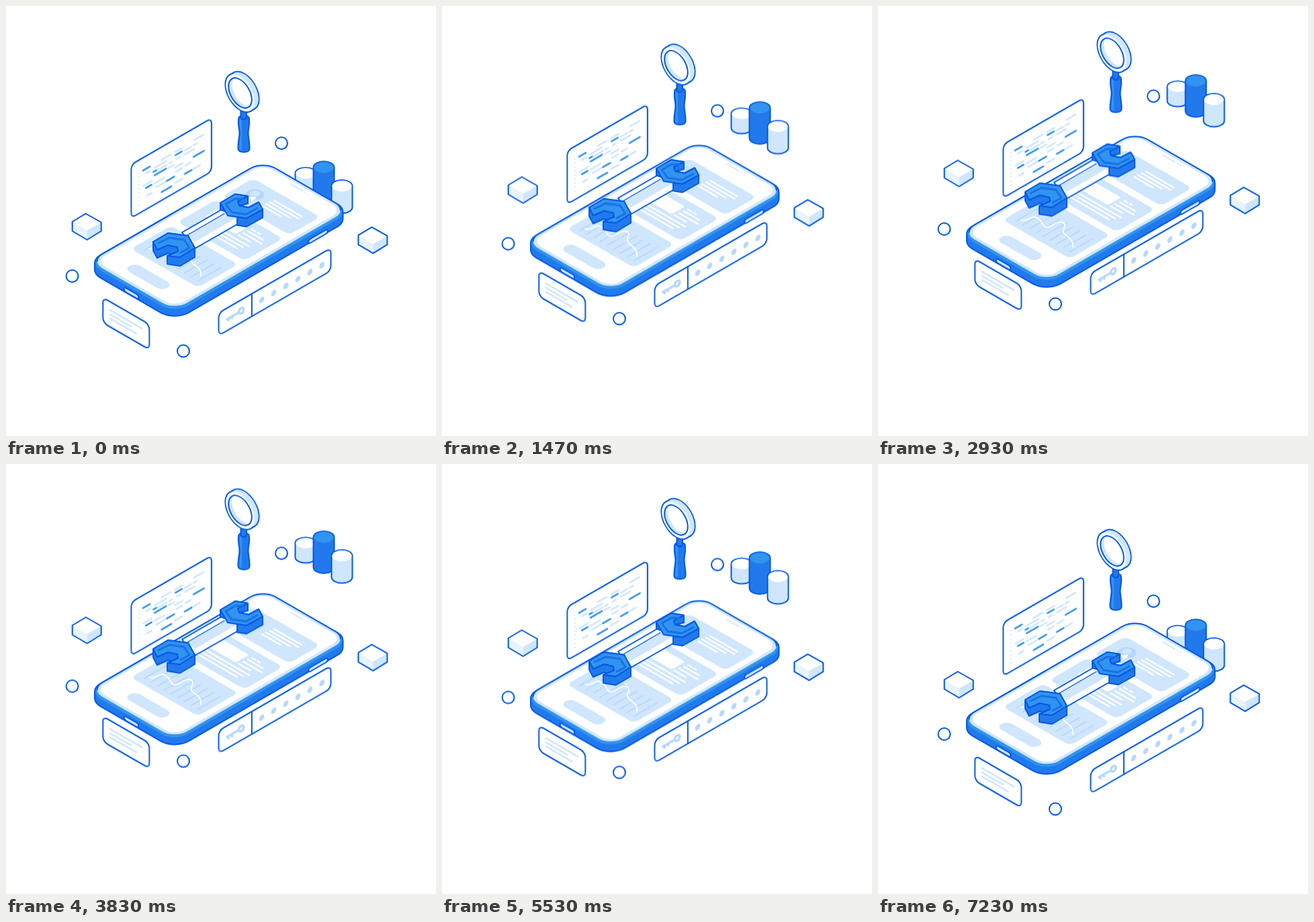
An HTML page without scripts for the animation above (7.93 s loop, 640x640 px).

```html
<!DOCTYPE html>
<html lang="en">
<head>
<meta charset="utf-8">
<title>Isometric phone repair</title>
<style>
  html, body { margin: 0; height: 100%; overflow: hidden; background: #fff; }
  svg { display: block; width: 100vw; height: 100vh; }
  svg * { vector-effect: non-scaling-stroke; }

  .float { animation: float 7930ms infinite; }
  @keyframes float {
    0% { transform: translateY(0); animation-timing-function: cubic-bezier(.325, 0, .19, 1); }
    45.586% { transform: translateY(var(--rise)); animation-timing-function: cubic-bezier(.81, 0, .675, 1); }
    91.173%, 100% { transform: translateY(0); }
  }

  .line { stroke: #0058e6; stroke-width: 2; stroke-linejoin: round; stroke-linecap: round; }
  .none { fill: none; }
  .white { fill: #fff; }
  .faint { fill: #e8f3fe; }
  .pale { fill: #cfe6fd; }
  .soft { fill: #b7d8fb; }
  .bright { fill: #3094f0; }
  .deep { fill: #2279eb; }
  .text { fill: none; stroke: #cfe6fd; stroke-width: 2.5; stroke-linecap: round; }
  .text.hot { stroke: #3094f0; }
  .text.clear { stroke: #fff; }
  .groove { fill: none; stroke: #1b6fe6; stroke-width: 2.8; stroke-linejoin: round; stroke-linecap: round; }
</style>
</head>
<body>
<svg viewBox="0 0 640 640" xmlns="http://www.w3.org/2000/svg">
  <defs>
    <clipPath id="lens"><circle r="20"/></clipPath>
    <clipPath id="disc"><circle r="9"/></clipPath>
    <g id="ball">
      <circle r="9" fill="#dcecfd"/>
      <circle cx="-2" cy="-2" r="8.6" class="white" clip-path="url(#disc)"/>
      <circle r="9" class="line none"/>
    </g>
    <g id="cube">
      <path class="white" d="M-2-24L21-11L0 1L-22-12Z"/>
      <path class="faint" d="M-22-12L0 1V15L-22 2Z"/>
      <path class="pale" d="M21-11L0 1V15L21 2Z"/>
      <path class="line none" d="M-2-24L21-11V2L0 15L-22 2V-12Z"/>
    </g>
  </defs>

  <!-- cylinders -->
  <g class="float" style="--rise:-131.5px">
    <path class="line pale" d="M430.5 249V270A15.5 8.5 0 0 0 461.5 270V249A15.5 8.5 0 0 0 430.5 249Z"/>
    <ellipse class="white" cx="446" cy="249" rx="14.5" ry="7.7"/>
    <path class="line deep" d="M457.5 240.2V285A15.5 9 0 0 0 488.5 285V240.2A15.5 9 0 0 0 457.5 240.2Z"/>
    <ellipse class="bright" cx="473" cy="240.2" rx="14.5" ry="8.2"/>
    <path class="line pale" d="M484.5 268V299.5A15.5 9 0 0 0 515.5 299.5V268A15.5 9 0 0 0 484.5 268Z"/>
    <ellipse class="white" cx="500" cy="268" rx="14.5" ry="8.2"/>
  </g>

  <!-- code panel -->
  <g class="float" style="--rise:-30.5px">
    <g transform="matrix(.866 -.5 0 1 186.4 236)">
      <rect class="line white" width="138" height="79.4" rx="7"/>
      <path class="text" stroke-dasharray="1.5 4.5" style="stroke-linecap:butt" d="M13 18V68"/>
      <path class="text" d="M52 19h16M75 19h13M108 17.5h16
        M25 26h8M40 25h20M92 25h11M107 25h6
        M46 31h15M65 31h5M78 31h6M92 31h16
        M21 42h14M64 37h10M75 42h13
        M40 48h17M77 49h10M93 48h10
        M43 55h15M27 60h8M107 60h11M75 65h13"/>
      <path class="text hot" d="M20 19h12M76 24h11M38 30h5M40 36h20M107 42h18M25 47.5h10M61 55h13M92 60h12M52 67h17"/>
    </g>
  </g>

  <!-- phone -->
  <g class="float" style="--rise:-44px">
    <path class="line deep" d="M132 382.6A29.4 17 0 0 1 140.6 370.6L361.7 243A29.4 17 0 0 1 403.3 243L492.9 294.7A29.4 17 0 0 1 501.5 306.7V316.7A29.4 17 0 0 1 492.9 328.7L271.8 456.4A29.4 17 0 0 1 230.2 456.4L140.6 404.6A29.4 17 0 0 1 132 392.6Z"/>
    <g transform="matrix(.866 .5 -.866 .5 382.5 228)">
      <rect class="bright" x="4" y="4" width="149.5" height="301.3" rx="23"/>
      <rect class="pale" x="3" y="3" width="145.5" height="297.3" rx="21"/>
      <rect class="white" x="7.5" y="7.5" width="136.5" height="288.3" rx="17"/>
      <path class="line none" d="M9.2 294.2A21 21 0 0 1 3 279.3V24A21 21 0 0 1 24 3H127.5A21 21 0 0 1 142.3 9.2"/>
      <path class="text" style="stroke-width:2" d="M61 13h20M86 13h.1M91 13h.1"/>

      <g class="pale">
        <rect x="20" y="37" width="115" height="53" rx="8"/>
        <rect x="20" y="101" width="115" height="66" rx="8"/>
        <rect x="20" y="178" width="115" height="69" rx="8"/>
        <rect x="44" y="264.5" width="65" height="18" rx="9"/>
      </g>

      <circle class="soft" cx="46" cy="60" r="11.5"/>
      <circle class="pale" cx="44" cy="58" r="6"/>
      <path class="white" d="M50 62a8 8 0 0 1 2 10l-8-4z"/>
      <path class="text clear" d="M71 52H118M70 58H119M69 64H110M69 70H101"/>

      <rect class="white" x="36" y="112" width="52" height="23" rx="3"/>
      <path class="text clear" d="M95 114h6M105 114h4M94 120H120M93 127H125M92 134H112M38 142H118M38 148.5H114M38 155H110"/>

      <path class="none" stroke="#b7d8fb" stroke-width="1.5" d="M33 197V238M44.5 197V238M56 197V238M67.5 197V238M79 197V238M90.5 197V238M102 197V238M113.5 197V238M125 197V238"/>
    </g>
    <path class="text clear" style="stroke-width:1.8" d="M213 361C222 366 228 352 238 359C248 366 244 376 257 371C270 362 281 362 277 374C270 386 292 384 290 402"/>
    <rect class="line pale" x="-16.5" y="-3" width="33" height="6" rx="3" transform="matrix(.866 -.5 0 1 464.5 343)"/>
    <rect class="line pale" x="-12.5" y="-3" width="25" height="6" rx="3" transform="matrix(.866 .5 0 1 186.5 427.5)"/>
  </g>

  <!-- wrench: the shaft joins the front side of the far head -->
  <g class="float" style="--rise:-76px">
    <path class="line deep" d="M319 293L341 280L360 283V294L348 297L361 300L376 292L382 303V315L358 328.5L330 324L319 306Z"/>
    <path class="line white" d="M262 337L320 303.5L344 312V325L281 361Z"/>
    <path class="pale" d="M270 341L325 309L343 315L281 351Z"/>
    <path class="line none" style="stroke-width:1.4" d="M270 341L325 309"/>
    <path class="line bright" d="M319 293L341 280L360 283L345 291L347 297L361 300L376 292L382 303L358 316L330 312Z"/>
    <path class="groove" d="M352 287L341 287L327 295L336 307L357 310L374 301"/>

    <path class="line deep" d="M219 351L241 338L271 342L281 360V374L259 387L240 384V372L246 369.5L241 368L225 375L219 364Z"/>
    <path class="line bright" d="M219 351L241 338L271 342L281 360L259 374L240 372L256 365L255 359L241 356L225 363Z"/>
    <path class="groove" d="M227 353L243 345L265 348L273 360L260 367"/>
  </g>

  <!-- magnifier -->
  <g class="float" style="--rise:-60.5px">
    <path class="line deep" d="M346 168Q346 163 354 163T362 168C363 178 360.5 182 360.5 189S363 203 362.5 213Q362 217.5 354 217.5T345.5 213C345 203 347.5 196 347.5 189S345 178 346 168Z"/>
    <path class="bright" d="M347.5 168C347 178 349 182 349 189S347 203 347 213L351 215.5V166Z"/>
    <path class="line deep" d="M349.5 154V167Q354 171 358 167V154Z"/>
    <g transform="matrix(.866 .5 0 1 354.5 126)"><circle class="line pale" r="25.5"/></g>
    <g transform="matrix(.866 .5 0 1 348.5 129.5)"><circle class="line pale" r="25.5"/></g>
    <path class="line none" d="M332.8 102.5L338.8 99M364.2 156.5L370.2 153"/>
    <path class="pale" d="M333.4 103.6L339.4 100.1L369.6 151.9L363.6 155.4Z"/>
    <g transform="matrix(.866 .5 0 1 354.5 126)"><circle class="pale" r="24.4"/></g>
    <g transform="matrix(.866 .5 0 1 348.5 129.5)">
      <circle class="white" r="24.4"/>
      <circle class="pale" r="20"/>
      <g clip-path="url(#lens)"><circle class="white" cx="6" cy="-6" r="20"/></g>
      <circle class="line none" r="20"/>
    </g>
  </g>

  <!-- note -->
  <g class="float" style="--rise:-58.5px">
    <g transform="matrix(.866 .5 0 1 144.3 434)">
      <rect class="line white" width="79.7" height="37.5" rx="7.5"/>
      <path class="text" d="M12 12.5H67M12 19H48M12 25H57"/>
    </g>
  </g>

  <!-- password field -->
  <g class="float" style="--rise:-60px">
    <g transform="matrix(.866 -.5 0 1 316.5 456.8)">
      <rect class="line white" width="192.8" height="33.7" rx="7.5"/>
      <path class="line none" d="M57 0V33.7"/>
      <path class="text" style="stroke:#b7d8fb;stroke-width:3.5" d="M14 16.5H35M17 17V19.5M23 17V19.5"/>
      <circle class="none" cx="39" cy="16.2" r="4" stroke="#b7d8fb" stroke-width="3.5"/>
      <g class="soft">
        <circle cx="74" cy="17.7" r="4.4"/>
        <circle cx="94.7" cy="17.7" r="4.4"/>
        <circle cx="115.4" cy="17.7" r="4.4"/>
        <circle cx="136.1" cy="17.7" r="4.4"/>
        <circle cx="156.8" cy="17.7" r="4.4"/>
        <circle cx="177.5" cy="17.7" r="4.4"/>
      </g>
    </g>
  </g>

  <!-- loose solids -->
  <g class="float" style="--rise:-81px"><use href="#cube" x="120.7" y="333"/></g>
  <g class="float" style="--rise:-60.5px"><use href="#cube" x="546.4" y="353.2"/></g>
  <g class="float" style="--rise:-71.5px">
    <use href="#ball" x="410" y="204.2"/>
    <use href="#ball" x="98.6" y="402"/>
    <use href="#ball" x="264" y="513.5"/>
  </g>
</svg>
</body>
</html>
```
